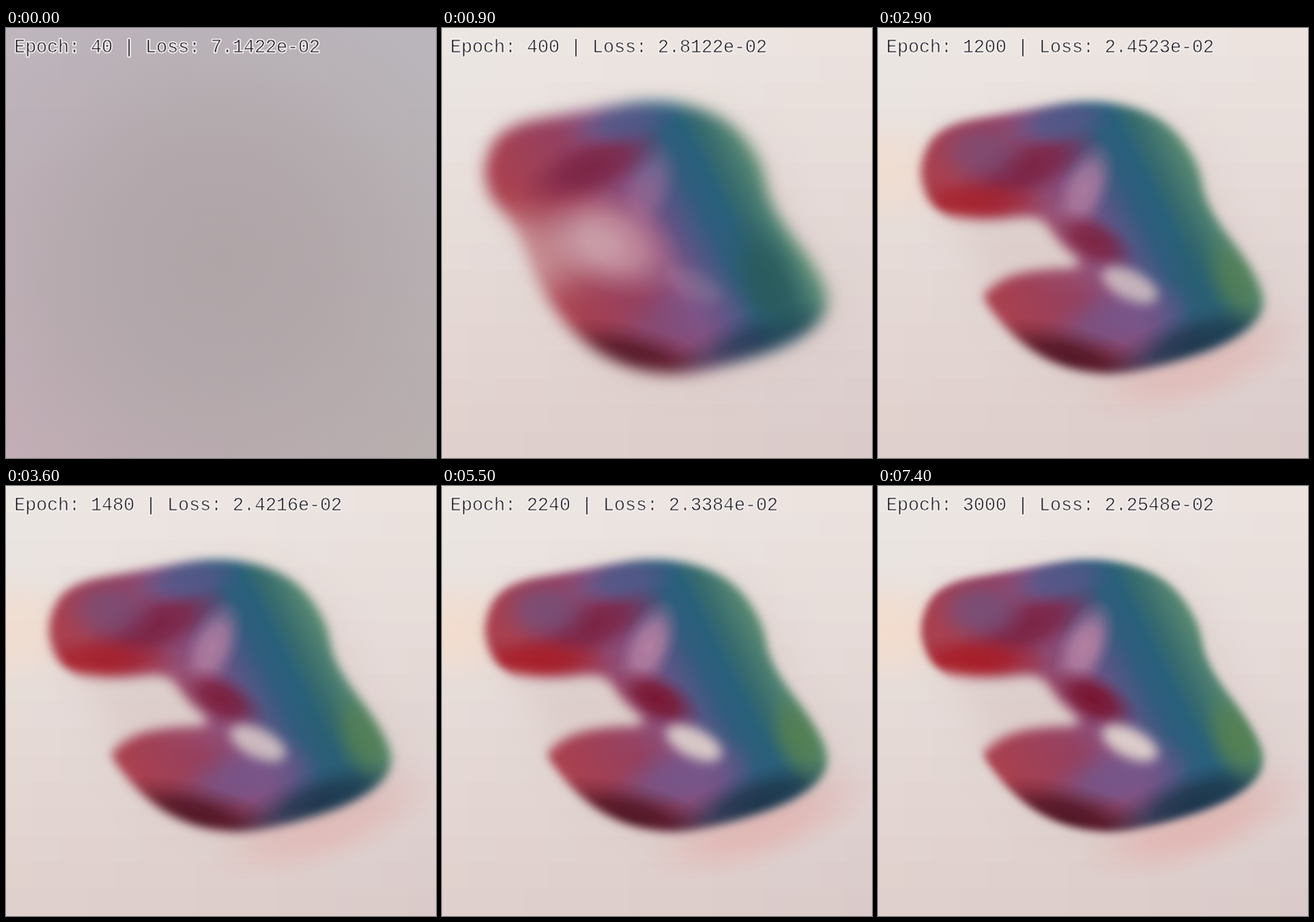
Write an HTML page with a canvas that moves like this. It is 512 px wide and 512 px high and loops after 7.5 s.

```html
<!DOCTYPE html>
<html lang="en">
<head>
<meta charset="utf-8">
<title>Training progress</title>
<style>
html, body { margin: 0; width: 100%; height: 100%; overflow: hidden; background: #b4abae; }
canvas { display: block; width: 512px; height: 512px; }
</style>
</head>
<body>
<canvas id="stage" width="512" height="512"></canvas>
<script>
const SIZE = 512, FRAMES = 75, FRAME_MS = 100;

// Backdrop corners: top left, top right, bottom left, bottom right.
const greyCorners = ["#beb5bd", "#bab6bb", "#c3aeb6", "#b8afae"];
const paleCorners = ["#ece7e3", "#ece3df", "#e0cfcc", "#d9cac9"];

const outline = [[48, 162], [72, 116], [160, 101], [255, 83], [338, 103], [382, 158], [390, 212],
                 [445, 283], [466, 334], [425, 374], [340, 403], [262, 416], [182, 390],
                 [118, 318], [92, 240], [57, 205]];
const notch = [[20, 214], [85, 224], [135, 230], [194, 222], [214, 256], [250, 286],
               [195, 286], [142, 299], [112, 335], [20, 330]];

// Hue runs across the body, from the red lobes to the green flank.
const across = [0.889, -0.458];
const hues = [[-20, "#a8404f"], [64, "#944060"], [110, "#865080"], [142, "#5a5585"],
              [176, "#305c7d"], [200, "#28607a"], [221, "#376b6e"], [262, "#5c8c72"]];

// Tints: x, y, rx, ry, angle, colour, early strength, late strength.
const tints = [
  [205, 255, 90, 60, 0.5, "#c58a9c", 0.85, 0.1],
  [180, 165, 95, 40, -0.4, "#7a2242", 0.9, 0.95],
  [125, 148, 60, 42, 0, "#74507a", 0, 0.9],
  [115, 208, 90, 32, 0, "#a81c26", 0.1, 0.95],
  [218, 112, 70, 30, -0.2, "#525888", 0.8, 0.9],
  [246, 192, 32, 62, 0.4, "#b480a2", 0.4, 1],
  [256, 254, 60, 32, 0.5, "#78142f", 0, 1],
  [285, 348, 95, 45, -0.3, "#75568a", 0.5, 0.95],
  [225, 398, 120, 45, 0.25, "#4a1220", 0.9, 0.95],
  [375, 380, 120, 42, -0.35, "#1c3448", 0.7, 0.95],
  [388, 305, 45, 90, -0.4, "#2a5a5a", 0.9, 0],
  [426, 298, 36, 62, -0.4, "#55804f", 0, 0.9]];

const lossKeys = [[0, 7.1422], [9, 2.8122], [21, 2.4874], [36, 2.4216],
                  [46, 2.3582], [64, 2.3186], [74, 2.2548]];

const mix = (a, b, k) => a + (b - a) * k;
const span = (v, from, to) => Math.min(1, Math.max(0, (v - from) / (to - from)));
const easeOut = (k, power) => 1 - (1 - k) ** power;

function makeCanvas(size) {
  const canvas = document.createElement("canvas");
  canvas.width = canvas.height = size;
  return canvas.getContext("2d");
}

const ctx = document.getElementById("stage").getContext("2d");
const paint = makeCanvas(SIZE), mask = makeCanvas(SIZE), corners = makeCanvas(2);

// Closed smooth curve that runs through the middle of each side.
function smoothPath(points) {
  const path = new Path2D();
  const n = points.length;
  for (let i = 0; i <= n; i++) {
    const [x, y] = points[i % n], [nx, ny] = points[(i + 1) % n];
    const mx = (x + nx) / 2, my = (y + ny) / 2;
    if (i) path.quadraticCurveTo(x, y, mx, my);
    else path.moveTo(mx, my);
  }
  path.closePath();
  return path;
}

const bodyPath = smoothPath(outline), notchPath = smoothPath(notch);
const holePath = new Path2D();
holePath.ellipse(300, 306, 36, 17, 0.45, 0, 2 * Math.PI);

function fillSoft(c, path, blur, alpha, colour = "#fff") {
  c.filter = `blur(${blur}px)`;
  c.globalAlpha = alpha;
  c.fillStyle = colour;
  c.fill(path);
  c.filter = "none";
  c.globalAlpha = 1;
}

function glow(c, x, y, rx, ry, angle, colour, alpha) {
  const fade = c.createRadialGradient(0, 0, 0, 0, 0, 1);
  fade.addColorStop(0, colour);
  fade.addColorStop(0.4, colour + "cc");
  fade.addColorStop(0.75, colour + "40");
  fade.addColorStop(1, colour + "00");
  c.save();
  c.translate(x, y);
  c.rotate(angle);
  c.scale(rx, ry);
  c.globalAlpha = alpha;
  c.fillStyle = fade;
  c.fillRect(-1, -1, 2, 2);
  c.restore();
}

function drawCorners(colours, alpha) {
  colours.forEach((colour, i) => {
    corners.fillStyle = colour;
    corners.fillRect(i % 2, i >> 1, 1, 1);
  });
  ctx.globalAlpha = alpha;
  ctx.drawImage(corners.canvas, 0.5, 0.5, 1, 1, 0, 0, SIZE, SIZE);
  ctx.globalAlpha = 1;
}

function drawBackdrop(emerge, growth) {
  drawCorners(greyCorners, 1);
  glow(ctx, 250, 280, 340, 340, 0, "#aea4a6", 0.9);
  drawCorners(paleCorners, emerge);
  glow(ctx, 10, 172, 110, 70, 0, "#f5dccb", growth * 0.8);
  glow(ctx, 380, 400, 150, 55, -0.35, "#e6aaa6", growth * 0.7);
  ctx.save();
  ctx.translate(16, 10);
  fillSoft(ctx, bodyPath, 20, emerge * 0.4, "#d3bfbb");
  ctx.restore();
}

function drawMask(emerge, carve, growth) {
  mask.clearRect(0, 0, SIZE, SIZE);
  fillSoft(mask, bodyPath, mix(50, 9, emerge) - 4 * growth, 1);
  mask.globalCompositeOperation = "destination-out";
  fillSoft(mask, notchPath, mix(20, 7, carve), mix(0.5, 1, carve));
  fillSoft(mask, holePath, 7, mix(0.15, 1, growth));
  mask.globalCompositeOperation = "source-over";
}

function drawBody(emerge, growth) {
  const [from, to] = [hues[0][0], hues.at(-1)[0]];
  const sweep = paint.createLinearGradient(...across.map(v => v * from), ...across.map(v => v * to));
  for (const [at, colour] of hues) sweep.addColorStop(span(at, from, to), colour);
  paint.fillStyle = sweep;
  paint.fillRect(0, 0, SIZE, SIZE);
  for (const [x, y, rx, ry, angle, colour, early, late] of tints) {
    glow(paint, x, y, rx, ry, angle, colour, mix(early, late, growth));
  }
  paint.globalCompositeOperation = "destination-in";
  paint.drawImage(mask.canvas, 0, 0);
  paint.globalCompositeOperation = "source-over";

  ctx.globalAlpha = emerge;
  ctx.drawImage(paint.canvas, 0, 0);
  ctx.globalAlpha = 1;
}

function lossAt(frame) {
  const i = Math.max(1, lossKeys.findIndex(([f]) => f >= frame));
  const [f0, v0] = lossKeys[i - 1], [f1, v1] = lossKeys[i];
  const k = span(frame, f0, f1);
  return mix(v0, v1, i === 1 ? easeOut(k, 2.2) : k);
}

function drawLabel(frame) {
  const label = `Epoch: ${(frame + 1) * 40} | Loss: ${lossAt(frame).toFixed(4)}e-02`;
  const edge = width => {
    ctx.lineWidth = width;
    ctx.strokeText(label, 10, 29);
  };
  ctx.font = '21.67px "Liberation Mono", "Courier New", monospace';
  ctx.lineJoin = "round";
  ctx.strokeStyle = "#f4f0f0";
  ctx.fillStyle = "#1c1a20";
  edge(2.6);
  ctx.fillText(label, 10, 29);
  edge(0.5); // thins the letters
}

function draw(frame) {
  const emerge = easeOut(span(frame, 0, 9), 2.2);
  const carve = easeOut(span(frame, 9, 21), 1.7);
  const refine = easeOut(span(frame, 21, 74), 2);
  const growth = 0.65 * carve + 0.35 * refine;

  drawBackdrop(emerge, growth);
  drawMask(emerge, carve, growth);
  drawBody(emerge, growth);
  drawLabel(frame);
}

let shown = -1;
function tick() {
  const frame = Math.floor(performance.now() / FRAME_MS) % FRAMES;
  if (frame !== shown) draw(shown = frame);
  requestAnimationFrame(tick);
}
tick();
</script>
</body>
</html>
```
